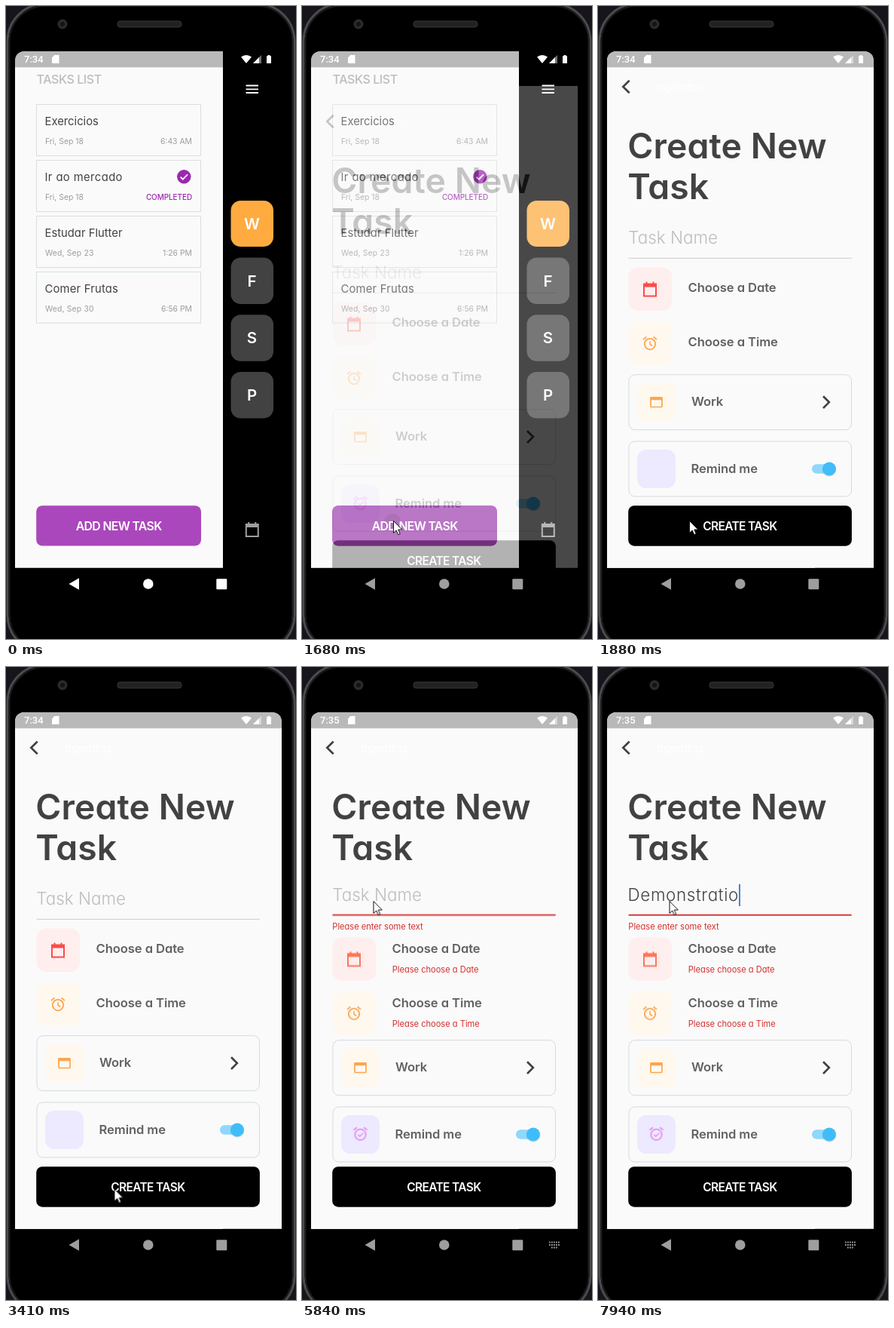
An HTML page for the animation above (8 s loop, 385x839 px).

```html
<!DOCTYPE html>
<html lang="pt">
<head>
<meta charset="utf-8">
<title>Task app</title>
<style>
html, body { margin: 0; width: 100%; height: 100%; overflow: hidden; background: #000; }
svg { display: block; width: 385px; height: 839px; font-family: Inter, "Open Sans", sans-serif;
  font-feature-settings: "cv11"; font-optical-sizing: none; }
.line { fill: none; stroke: currentColor; }
.med { font-weight: 500; }
.bold { font-weight: 600; }
.card rect { fill: none; stroke: #d9dede; }
.name { font-size: 14.8px; fill: #424242; }
.meta { font-size: 10.4px; fill: #9e9e9e; }
.end { text-anchor: end; }
.mid { text-anchor: middle; }
.letter { font-size: 20.5px; fill: #fff; font-weight: 600; text-anchor: middle; }
.label { font-size: 16.6px; fill: #616161; font-weight: 600; letter-spacing: -.08px; }
.error { font-size: 11.1px; fill: #d32f2f; }
.entry { font-size: 22.4px; font-weight: 300; }

/* 1% of the loop is 80 ms */
.nav, .press, .page, .shift, .errors, .rule, .hint, .tint, .bell, .keys, .cursor {
  animation: 8s step-end infinite; }
.nav { animation-name: dim; }
.press { animation-name: press; }
.page { animation-name: enter; }
.shift { animation-name: shift; }
.errors { animation-name: errors; }
.rule { animation-name: rule; }
.hint { animation-name: hint; }
.tint { animation-name: tint; }
.bell { animation-name: bell; }
.keys { animation-name: keys; }
.cursor { animation-name: point; }

@keyframes dim {
  0% { color: #fff; }
  9.75% { color: #fff; animation-timing-function: linear; }
  13.5%, 100% { color: #9e9e9e; }
}
@keyframes press { 0% { opacity: 0; } 19.5%, 100% { opacity: 1; } }
@keyframes enter {
  0% { opacity: 0; transform: translateY(171px); }
  21% { opacity: .29; transform: translateY(46px); }
  22.25% { opacity: .66; transform: translateY(4.5px); }
  23.5%, 100% { opacity: 1; transform: none; }
}
@keyframes shift { 0% { transform: none; } 44.25%, 100% { transform: translateY(var(--dy)); } }
@keyframes errors { 0% { opacity: 0; } 44.25% { opacity: .5; } 45.75%, 100% { opacity: 1; } }
@keyframes rule {
  0% { stroke: #d3d3d3; stroke-width: 1.2px; }
  44.25% { stroke: #e07070; stroke-width: 1.3px; }
  66.125%, 100% { stroke: #d83a3a; stroke-width: 2px; }
}
@keyframes hint {
  0% { opacity: 1; }
  76.875% { opacity: .6; }
  78.375% { opacity: .2; }
  79.875%, 100% { opacity: 0; }
}
@keyframes tint { 0% { color: #fa4d46; } 44.25%, 100% { color: #fa7658; } }
@keyframes bell { 0% { opacity: 1; } 23.5% { opacity: 0; } 44.25%, 100% { opacity: 1; } }
@keyframes keys { 0% { opacity: 0; } 67.5%, 100% { opacity: 1; } }
@keyframes point {
  0% { transform: translate(165px, 842px); }
  9.75% { transform: translate(165px, 839px); animation-timing-function: cubic-bezier(.3, .2, .4, 1); }
  18.125% { transform: translate(121px, 682px); }
  34.375% { transform: translate(136px, 688px); }
  35.875% { transform: translate(143.5px, 691.5px); }
  59.125% { transform: translate(129.5px, 495.5px); }
  60.625% { transform: translate(129.5px, 495.5px); animation-timing-function: ease-out; }
  64.75%, 100% { transform: translate(94.5px, 310px); }
}
</style>
</head>
<body>
<svg viewBox="0 0 385 839">
  <defs>
    <clipPath id="screen"><path d="M12 744.8V72a12 12 0 0 1 12-12H354a12 12 0 0 1 12 12V744.8Z"/></clipPath>
    <g id="calendar">
      <path class="line" stroke-width="2" d="M-8-7H8V9H-8ZM-4.5-10V-7M4.5-10V-7"/>
      <path fill="currentColor" d="M-8-7H8V-3H-8Z"/>
    </g>
    <g id="alarm" class="line" stroke-width="1.8">
      <circle cy=".8" r="7.2"/>
      <path d="M-9-5.2L-4.6-8.8M9-5.2L4.6-8.8"/>
    </g>
  </defs>

  <!-- phone body -->
  <rect width="385" height="839" fill="#17151b"/>
  <rect x="2" y="-3" width="381" height="860" rx="50" fill="#000" stroke="#4c4c4f" stroke-width="3"/>
  <rect x="4.5" y="0" width="376" height="854" rx="47" fill="none" stroke="#1c1c1e" stroke-width="2"/>
  <circle cx="75" cy="24" r="6.5" fill="#2b2b2d"/>
  <circle cx="75" cy="24" r="3" fill="#141416"/>
  <rect x="148" y="20" width="85" height="8" rx="3.5" fill="#222224" stroke="#38383a"/>

  <g clip-path="url(#screen)">
    <!-- task list -->
    <rect x="12" y="60" width="354" height="685" fill="#000"/>
    <rect x="12" y="60" width="276" height="685" fill="#fafafa"/>
    <text class="med" x="40.5" y="103.3" font-size="16" letter-spacing="-.4" fill="#bdbdbd">TASKS LIST</text>
    <g class="card">
      <rect x="40.5" y="130.5" width="218" height="68"/>
      <text class="name" x="51.5" y="158">Exercicios</text>
      <text class="meta" x="52" y="182.7">Fri, Sep 18</text>
      <text class="meta end" x="247" y="182.7">6:43 AM</text>
    </g>
    <g class="card">
      <rect x="40.5" y="204.5" width="218" height="68"/>
      <text class="name" x="51.5" y="232" letter-spacing=".4">Ir ao mercado</text>
      <text class="meta" x="52" y="256.6">Fri, Sep 18</text>
      <text class="med end" x="247" y="256.6" font-size="10" letter-spacing="-.1" fill="#9c27b0">COMPLETED</text>
      <circle cx="236.3" cy="226.3" r="9.2" fill="#9c27b0"/>
      <path d="M231.7 226.6l3.1 3.1 6.2-6.3" fill="none" stroke="#fff" stroke-width="1.8"/>
    </g>
    <g class="card">
      <rect x="40.5" y="278.5" width="218" height="68"/>
      <text class="name" x="51.5" y="306">Estudar Flutter</text>
      <text class="meta" x="52" y="330.6" letter-spacing=".15">Wed, Sep 23</text>
      <text class="meta end" x="247" y="330.6">1:26 PM</text>
    </g>
    <g class="card">
      <rect x="40.5" y="352.5" width="218" height="67.5"/>
      <text class="name" x="51.5" y="380" letter-spacing=".2">Comer Frutas</text>
      <text class="meta" x="52" y="404.5" letter-spacing=".15">Wed, Sep 30</text>
      <text class="meta end" x="247" y="404.5">6:56 PM</text>
    </g>
    <rect x="40.2" y="662.2" width="218.8" height="53.4" rx="8" fill="#ab47bc"/>
    <g class="press">
      <rect x="40.2" y="662.2" width="218.8" height="53.4" rx="8" fill="#9f43af"/>
      <circle cx="120" cy="684" r="11" fill="#8b3b99"/>
    </g>
    <text class="bold mid" x="149.7" y="695" font-size="15.8" letter-spacing="-.65" fill="#fff">ADD NEW TASK</text>

    <!-- sidebar -->
    <path d="M318.5 105.5H335M318.5 110.3H335M318.5 115H335" stroke="#fff" stroke-width="1.8"/>
    <rect x="298.5" y="258" width="56.5" height="61" rx="13" fill="#ffab40"/>
    <rect x="298.5" y="333.5" width="56.5" height="61.5" rx="13" fill="#424242"/>
    <rect x="298.5" y="409.3" width="56.5" height="61.5" rx="13" fill="#424242"/>
    <rect x="298.5" y="485" width="56.5" height="61.5" rx="13" fill="#424242"/>
    <text class="letter" x="326.5" y="295.8">W</text>
    <text class="letter" x="326.5" y="371.5">F</text>
    <text class="letter" x="326.5" y="447.3">S</text>
    <text class="letter" x="326.5" y="523">P</text>
    <use href="#calendar" x="326.8" y="694" color="#9e9e9e"/>

    <!-- task form -->
    <g class="page">
      <rect x="12" y="60" width="354" height="685" fill="#fafafa"/>
      <path d="M41.7 98.7L33.3 107l8.4 8.3" fill="none" stroke="#424242" stroke-width="2.7"/>
      <text x="78" y="113" font-size="15" fill="#fff">agendas</text>
      <g class="bold" font-size="46.3" letter-spacing=".1" fill="#424242">
        <text x="39.3" y="202">Create New</text>
        <text x="39.3" y="256">Task</text>
      </g>

      <g class="shift" style="--dy:-5.5px">
        <text class="entry hint" x="40.3" y="315" fill="#bdbdbd">Task Name</text>
        <text class="entry" id="typed" x="39.5" y="315" letter-spacing=".65" fill="#424242"></text>
        <rect id="caret" y="293" width="2" height="29.5" fill="#4a7fd6"/>
        <path class="rule" d="M40.5 334.3H336.7"/>
      </g>

      <g class="shift" style="--dy:11.7px">
        <rect x="40.5" y="346.5" width="58" height="57.5" rx="13" fill="#ffeeee"/>
        <g class="tint"><use href="#calendar" x="69" y="375.5"/></g>
        <rect x="40.5" y="418.5" width="58" height="57.5" rx="13" fill="#fff8ee"/>
        <g transform="translate(69 447.3)" color="#fba64f">
          <use href="#alarm"/>
          <path class="line" stroke-width="1.5" d="M0-3V1.2L3.3 3.2"/>
        </g>
      </g>
      <text class="label" x="119.5" y="379">Choose a Date</text>
      <text class="label" x="119.5" y="451.2">Choose a Time</text>

      <g class="shift" style="--dy:6px">
        <g fill="none" stroke="#d4dadc">
          <rect x="41" y="488.7" width="295.5" height="73" rx="8"/>
          <rect x="41" y="577" width="295.5" height="73" rx="8"/>
        </g>
        <rect x="52" y="499.7" width="51.5" height="51" rx="12" fill="#fff8ee"/>
        <g color="#fba64f">
          <rect class="line" x="70" y="519" width="15" height="12.5" rx="1" stroke-width="1.7"/>
          <path fill="currentColor" d="M69.5 518.2H85.5V522.3H69.5Z"/>
        </g>
        <text class="label" x="124" y="530">Work</text>
        <path d="M299 517.2l7.8 7.9-7.8 7.9" fill="none" stroke="#424242" stroke-width="2.7"/>

        <rect x="52" y="588" width="51" height="51" rx="12" fill="#ede9fe"/>
        <g transform="translate(77.5 613)" color="#e590f5">
          <g class="bell">
            <use href="#alarm"/>
            <path class="line" stroke-width="1.5" d="M-3.3.8L-.8 3.3 3.6-1.3"/>
          </g>
        </g>
        <text class="label" x="123.5" y="618.5">Remind me</text>
        <rect x="284" y="607.3" width="30" height="12.5" rx="6.2" fill="#8fd8fb"/>
        <circle cx="307" cy="614.4" r="9.3" fill="#000" opacity=".12"/>
        <circle cx="307" cy="613.5" r="9" fill="#40bdf9"/>
      </g>

      <g class="errors error">
        <text x="40.3" y="348">Please enter some text</text>
        <text x="119.7" y="405">Please choose a Date</text>
        <text x="119.7" y="477.2">Please choose a Time</text>
      </g>

      <rect x="40.2" y="662.2" width="296.7" height="53.5" rx="8" fill="#000"/>
      <text class="bold mid" x="188.3" y="694.8" font-size="15.5" letter-spacing="-.65" fill="#fff">CREATE TASK</text>
    </g>

    <!-- status bar -->
    <rect x="12" y="60" width="354" height="21.3" fill="#000" opacity=".26"/>
  </g>
  <g fill="#fff">
    <text id="clock" class="med" x="24" y="75.3" font-size="13" style="font-family:Roboto,sans-serif"></text>
    <path d="M64.3 65H70.5V76H61V68.4Z"/>
    <path d="M312 67.5Q319 62.5 326 67.5L319 76Z"/>
    <path d="M339 65V76H328Z" opacity=".45"/>
    <path d="M336 68V76H328Z"/>
    <path d="M347.7 65H350.3V66.2H352V76H346V66.2H347.7Z"/>
  </g>

  <!-- navigation bar -->
  <g class="nav" fill="currentColor">
    <path d="M83.5 766L97 758.2V773.8Z"/>
    <circle cx="188.8" cy="766" r="6.8"/>
    <rect x="279.3" y="759.2" width="14" height="14" rx="1.2"/>
  </g>
  <path class="keys" d="M328 762.5H342M328 766H342M331 769.5H339.5" stroke="#9e9e9e" stroke-width="1.8" stroke-dasharray="1.8 1.2"/>

  <g class="cursor">
    <path d="M.5.5V16.5L4.2 13 6.7 18.7 9.2 17.6 6.8 12H11.8Z" fill="#fff" stroke="#111" stroke-width="1"/>
  </g>
</svg>
<script>
const LOOP = 8000;
const WORD = 'Demonstratio';
const KEY_TIMES = [6150, 6390, 6610, 6720, 6820, 6930, 7270, 7270, 7480, 7700, 7820, 7940];
const [typed, caret, clock] = ['typed', 'caret', 'clock'].map(id => document.getElementById(id));
let start;

function draw(t) {
  const count = KEY_TIMES.filter(time => time <= t).length;
  typed.textContent = WORD.slice(0, count);
  caret.setAttribute('x', 40.5 + (count ? typed.getComputedTextLength() - 1 : 0));
  caret.style.opacity = count || (t >= 5290 && t < 5840) ? 1 : 0;
  clock.textContent = t < 5400 ? '7:34' : '7:35';
}

function tick(now) {
  start ??= now;
  draw((now - start) % LOOP);
  requestAnimationFrame(tick);
}

draw(0);
requestAnimationFrame(tick);
</script>
</body>
</html>
```
